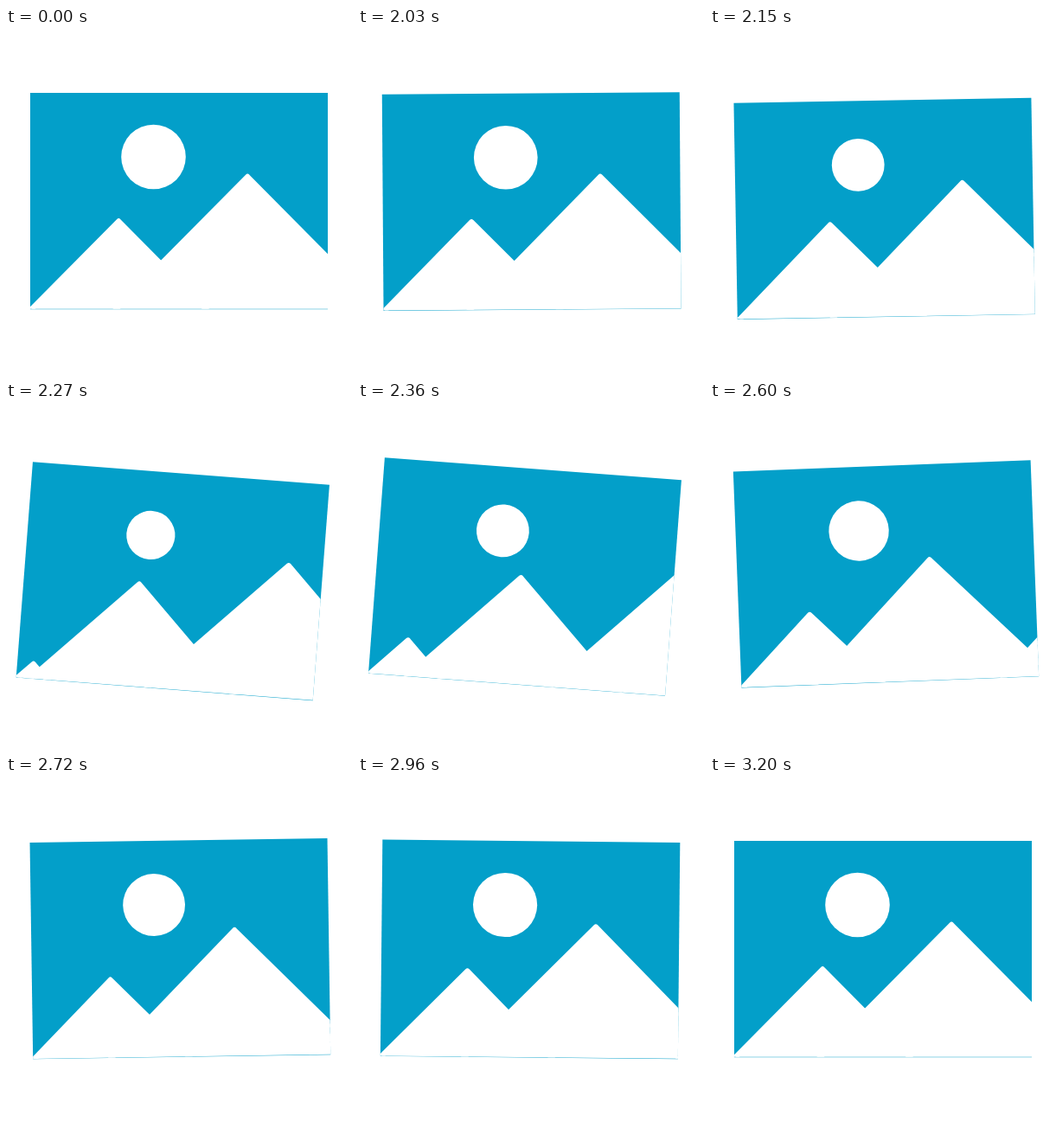
These frames come from a looping animation (400 by 400 pixels, 3.23 s). An HTML page:

```html
<!DOCTYPE html>
<html lang="en">
<head>
<meta charset="utf-8">
<title>Picture icon</title>
<style>
  html, body { margin: 0; height: 100%; overflow: hidden; background: #fff; }
  svg { display: block; width: 100vw; height: 100vh; }
</style>
</head>
<body>
<svg viewBox="0 0 400 400">
  <clipPath id="frame"><rect x="28" y="75" width="344" height="249.8"/></clipPath>
  <g id="card">
    <rect x="28" y="75" width="344" height="250.2" fill="#039fc9"/>
    <circle id="sun" cx="170.5" cy="149" fill="#fff"/>
    <g clip-path="url(#frame)">
      <path id="hills" fill="#fff" stroke="#fff" stroke-width="6" stroke-linejoin="round"/>
    </g>
  </g>
</svg>
<script>
const LOOP = 3230, START = 2000, STEP = 30, MOVE = 1230;
const [card, sun, hills] = ['card', 'sun', 'hills'].map(id => document.getElementById(id));

const clamp = v => Math.min(1, Math.max(0, v));
const mix = (a, b, u) => a + (b - a) * u;
const smooth = v => { const u = clamp(v); return u * u * (3 - 2 * u); };

// Cubic-bezier easing (x1, 0, x2, 1), solved by bisection
function ease(x, x1 = 0.395, x2 = 0.108) {
  let lo = 0, hi = 1, s = 0.5;
  for (let i = 0; i < 24; i++) {
    s = (lo + hi) / 2;
    const at = 3 * x1 * s * (1 - s) ** 2 + 3 * x2 * s * s * (1 - s) + s ** 3;
    if (at < x) lo = s; else hi = s;
  }
  return s * s * (3 - 2 * s);
}

// Damped swing: [ms, degrees] extremes joined by half cosines
const SWING = [[0, 0], [100, -1.95], [305, 4.9], [605, -2.2], [850, 0.8], [1150, 0], [MOVE, 0]];
function swing(t) {
  const i = Math.max(1, SWING.findIndex(k => k[0] >= t));
  const [t0, a] = SWING[i - 1], [t1, b] = SWING[i];
  return mix(a, b, (1 - Math.cos(Math.PI * (t - t0) / (t1 - t0))) / 2);
}

// 45-degree hill with its sharp tip at (x, y), rounded by the stroke
function hill(x, y) {
  const top = y + 4.24, base = 345, half = (base - top) / 1.01;
  return `M${x - half} ${base}L${x} ${top}L${x + half} ${base}Z`;
}

function draw(t) {
  const p = ease(t / MOVE);
  const rise = p + p * (1 - p) * (3.8 * (p - 0.77) ** 2 - 0.48);
  hills.setAttribute('d',
    hill(mix(24.5, 130.2, p), mix(326, 219, p)) +
    hill(mix(130.2, 279.2, p), mix(219, 167.5, rise)) +
    hill(mix(279.2, 531, p), 167.5));

  const shrink = t < 240 ? smooth(t / 240) : (1 - (t - 240) / (MOVE - 240)) ** 3;
  sun.setAttribute('r', 37.3 * (1 - 0.27 * shrink));

  const drop = 10.1 * smooth(1 - Math.abs(t - 180) / 180);
  card.setAttribute('transform', `translate(0 ${drop}) rotate(${swing(t)} 170.5 108)`);
}

function tick() {
  const time = performance.now() % LOOP;
  draw(Math.max(0, Math.floor((time - START) / STEP) * STEP));
  requestAnimationFrame(tick);
}
tick();
</script>
</body>
</html>
```
